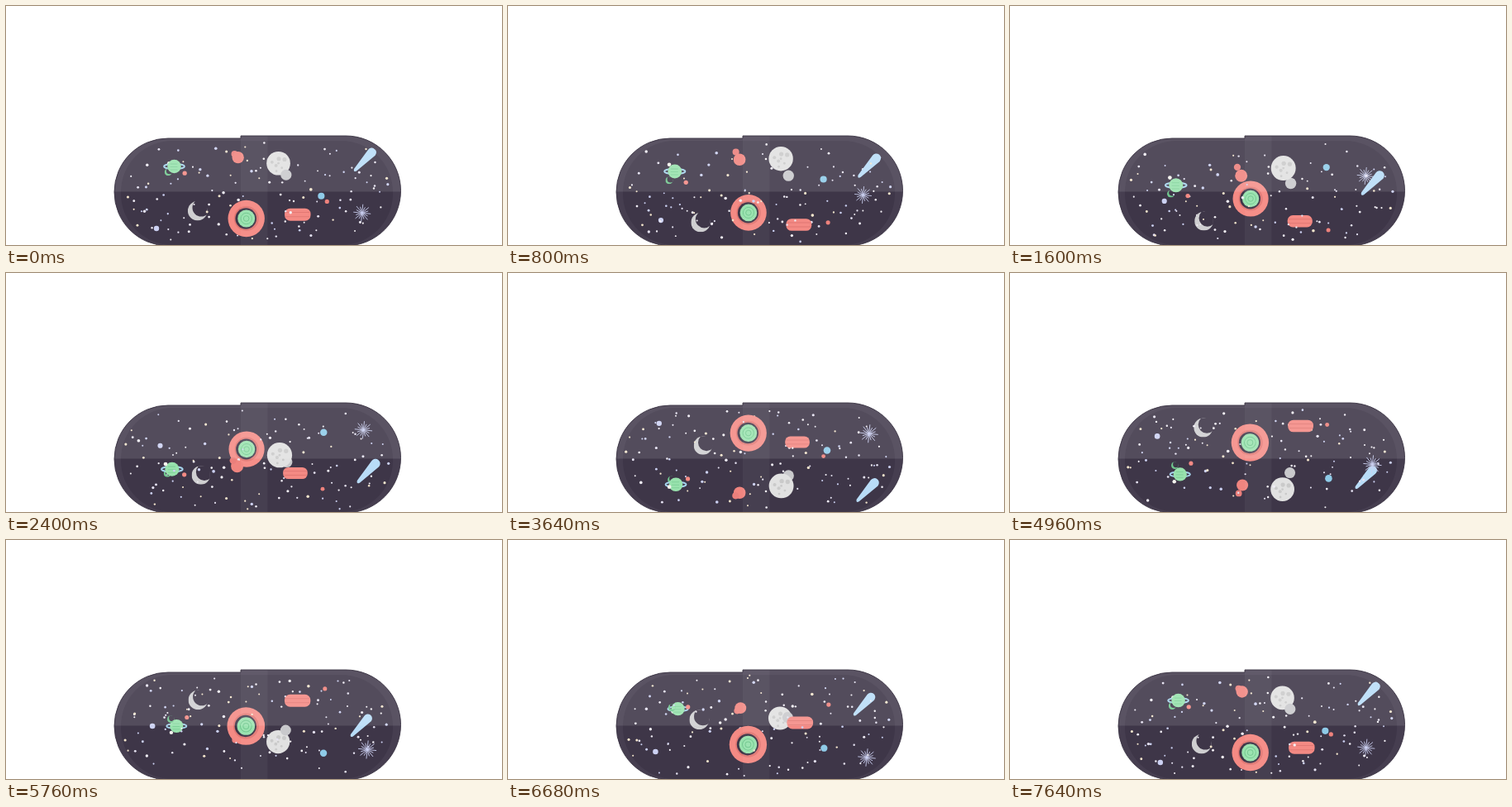
An HTML page with a canvas for the animation above (7680 ms loop, 600 by 289 pixels).

```html
<!DOCTYPE html>
<html lang="en">
<head>
<meta charset="utf-8">
<title>Space capsule</title>
<style>
html, body { margin: 0; width: 100%; height: 100%; overflow: hidden; background: #fff; }
canvas { display: block; }
</style>
</head>
<body>
<canvas id="stage" width="600" height="289"></canvas>
<script>
const ctx = document.getElementById('stage').getContext('2d');
const LOOP = 7680, DEPTH = 1100, VANISH = 304, AXIS = 225;
const { PI, sin, cos, sqrt } = Math;
const CORAL = '#f48a84', ROSE = '#e27874', GREEN = '#98e2ad', LEAF = '#70c78e';
const DARK = '#3e3648', CREAM = '#f3e5cc', LAVENDER = '#ccd1f2', ICE = '#b8dcf7';

let seed = 41;
function rnd() {
  seed = (seed * 16807) % 2147483647;
  return seed / 2147483647;
}

function disc(x, y, r, color) {
  ctx.fillStyle = color;
  ctx.beginPath();
  ctx.arc(x, y, r, 0, 2 * PI);
  ctx.fill();
}

function box(x, y, w, h, r, color) {
  ctx.fillStyle = color;
  ctx.beginPath();
  ctx.roundRect(x, y, w, h, r);
  ctx.fill();
}

function line(x1, y1, x2, y2, width, color) {
  ctx.strokeStyle = color;
  ctx.lineWidth = width;
  ctx.beginPath();
  ctx.moveTo(x1, y1);
  ctx.lineTo(x2, y2);
  ctx.stroke();
}

function ring(rx, ry, width, color) {
  ctx.strokeStyle = color;
  ctx.lineWidth = width;
  ctx.beginPath();
  ctx.ellipse(0, 0, rx, ry, 0, 0, 2 * PI);
  ctx.stroke();
}

function crescent(r, color) {
  ctx.beginPath();
  ctx.arc(0, 0, r, 0, 2 * PI);
  ctx.clip();
  ctx.fillStyle = color;
  ctx.beginPath();
  ctx.rect(-r, -r, 2 * r, 2 * r);
  ctx.arc(r * 0.38, -r * 0.33, r * 0.91, 0, 2 * PI);
  ctx.fill('evenodd');
}

function planet() {
  ring(12.5, 3, 1.8, '#a6d5ee');
  disc(0, 0, 8.3, GREEN);
  for (const y of [-3, 0.5, 4]) line(-5, y, 4, y, 1, '#80d09a');
}

function target() {
  disc(0, 0, 22.2, CORAL);
  disc(0, 0, 15, ROSE);
  disc(-0.5, 0, 12.8, DARK);
  disc(0, 0, 10.5, GREEN);
  for (const r of [3.3, 6.7]) ring(r, r, 1, LEAF);
}

function moon() {
  disc(0, 0, 14.6, '#e1e1e1');
  for (let i = 0; i < 7; i++) {
    const a = i * 2.4, d = 4 * sqrt(i);
    disc(d * cos(a), d * sin(a), 1.4 + (i % 3) * 0.6, '#cacaca');
  }
}

function comet() {
  ctx.fillStyle = ICE;
  ctx.beginPath();
  ctx.arc(10, -9.5, 5.5, -2.5, 0.95);
  ctx.lineTo(-8.5, 13);
  ctx.quadraticCurveTo(-12.5, 15, -11.5, 10.5);
  ctx.fill();
}

function burst() {
  for (let i = 0; i < 16; i++) {
    const a = i * PI / 8 + 0.1, r = i % 2 ? 8 : 10.8;
    line(0, 0, r * cos(a), r * sin(a), 0.9, LAVENDER);
  }
}

function bar() {
  box(-15.3, -7.3, 30.6, 14.6, 6.5, CORAL);
  for (const y of [-2.5, 2.5]) line(-14, y, 14, y, 1, ROSE);
}

// Everything turns once per loop around the long axis of the capsule.
const bodies = [];
const add = (x, reach, phase, draw) => bodies.push({ x, reach, phase, draw });
const ball = (r, color) => () => disc(0, 0, r, color);

add(203.5, 31, PI, planet);
add(197, 25.5, 2.8, () => crescent(4.4, LEAF));
add(196.5, 36, 3.37, ball(2.3, '#f4f4ee'));
add(217, 25, 2.7, ball(2.6, CORAL));
add(182, 44, 0, ball(3.2, LAVENDER));
add(233.7, 38, 0.95, () => crescent(11.5, '#cfcfd1'));
add(290.7, 32, 0, target);
add(280.5, 43, 3.34, ball(7.2, '#f0857f'));
add(276, 50, 3.5, ball(4, '#ea7f7b'));
add(330, 40.5, 3.65, moon);
add(339, 21.5, 3.38, ball(6.6, '#c9c9cc'));
add(351.5, 40, 0.85, bar);
add(383.7, 33, -1.42, ball(4.2, '#8fcbe8'));
add(385, 46, 1.33, ball(2.5, '#ee827c'));
add(432.5, 38.5, PI, comet);
add(434, 38, -0.82, burst);

const STARS = 112;
for (let i = 0; i < STARS; i++) {
  const x = 145 + 317 * (i + rnd()) / STARS;
  const edge = Math.max(0, 200 - x, x - 406);
  const reach = sqrt((62 * 62 - edge * edge) * rnd());
  const color = ['#f0edf5', '#e6e3f2', '#f4f1f6', LAVENDER, CREAM][Math.floor(5 * rnd())];
  add(x, reach, 2 * PI * rnd(), ball(1 + 0.8 * rnd() ** 2, color));
}

function drawBodies(turn) {
  for (const b of bodies) b.z = b.reach * sin(turn - b.phase);
  bodies.sort((a, b) => b.z - a.z);
  for (const b of bodies) {
    const scale = 1 - b.z / DEPTH;
    ctx.save();
    ctx.translate(VANISH + (b.x - VANISH) * scale, AXIS + b.reach * cos(turn - b.phase) * scale);
    ctx.scale(scale, scale);
    b.draw();
    ctx.restore();
  }
}

function shell() {
  ctx.beginPath();
  ctx.moveTo(284, 160);
  ctx.arc(196, 225, 65, -PI / 2, PI / 2, true);
  ctx.arc(411, 223.5, 66.5, PI / 2, -PI / 2, true);
  ctx.lineTo(284, 157);
  ctx.closePath();
}

function frame() {
  ctx.clearRect(0, 0, 600, 289);
  ctx.save();
  shell();
  ctx.fillStyle = '#463e50';
  ctx.fill();
  ctx.clip();
  box(139, 163, 329, 126, 62, DARK);

  ctx.save();
  ctx.beginPath();
  ctx.roundRect(137, 160, 334, 130, 64);
  ctx.clip();
  drawBodies(2 * PI * (performance.now() % LOOP) / LOOP);
  ctx.restore();

  box(130, 156, 348, 68.5, 0, 'rgba(255,255,255,.11)');
  box(284, 156, 32.5, 134, 0, 'rgba(255,255,255,.045)');
  ctx.restore();

  shell();
  ctx.strokeStyle = '#3b3545';
  ctx.lineWidth = 0.9;
  ctx.stroke();
  requestAnimationFrame(frame);
}
frame();
</script>
</body>
</html>
```
